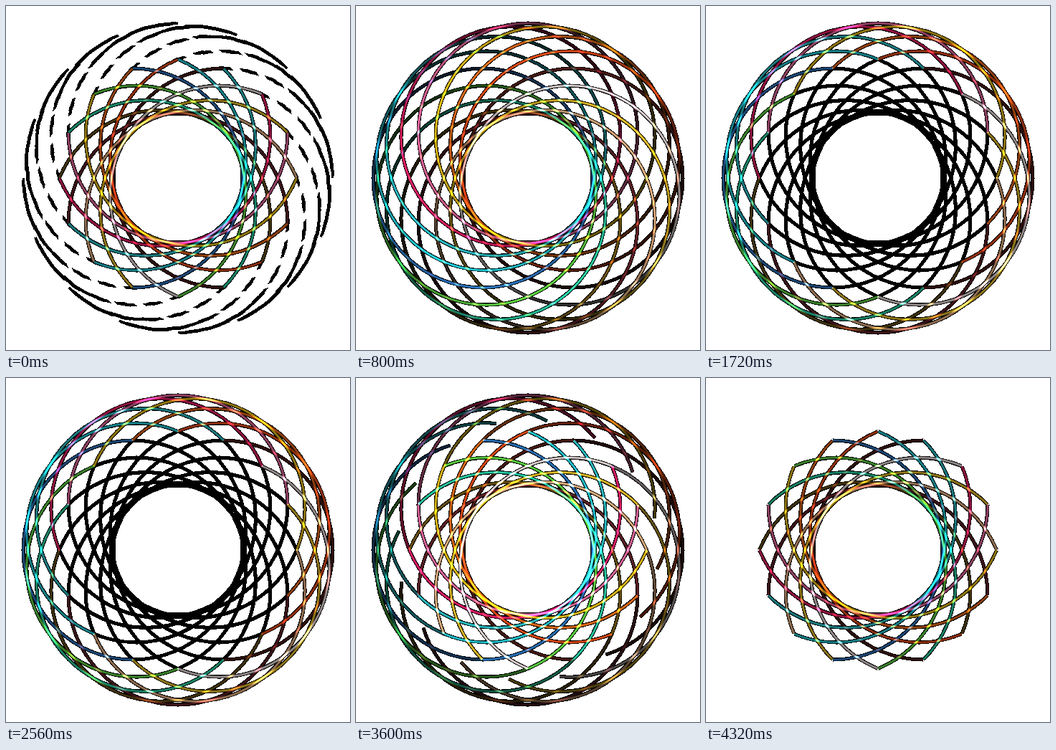
Animation of 480 by 480 pixels, one loop 5.16 s. Source, as an HTML page with a canvas:

```html
<!DOCTYPE html>
<html lang="en">
<head>
<meta charset="utf-8">
<title>Ring of circles</title>
<style>
html, body { margin: 0; width: 100%; height: 100%; overflow: hidden; background: #fff; }
canvas { display: block; width: 480px; height: 480px; }
</style>
</head>
<body>
<canvas id="stage" width="480" height="480"></canvas>
<script>
const SIZE = 480, MID = 240, RADIUS = 153, OFFSET = 63;
const LOOP = 5160, STEP = 40, TURN = 2 * Math.PI, PARTS = 60;
const IN_END = 1720, OUT_START = 2560, OUT_END = 1760;
const REST = 0.58, LINE = 5, HALO = 16, HALO_ALPHA = 0.06;

// One colour per circle, clockwise from the right
const COLORS = [
  [80, 26, 20], [255, 240, 240], [255, 210, 40], [255, 195, 140],
  [105, 34, 42], [115, 88, 20], [40, 230, 180], [100, 235, 70],
  [44, 125, 210], [35, 225, 240], [45, 215, 225], [255, 30, 110],
  [255, 110, 170], [255, 210, 20], [255, 115, 25], [255, 80, 20]
];

const ctx = document.getElementById('stage').getContext('2d', { willReadFrequently: true });
const glowCanvas = document.createElement('canvas');
glowCanvas.width = glowCanvas.height = SIZE;
const glow = glowCanvas.getContext('2d');

const clamp = v => Math.max(0, Math.min(1, v));
const mix = (a, b, p) => a + (b - a) * p;
const ease = v => (1 - Math.cos(Math.PI * clamp(v))) / 2;
const inner = x => x < 0.5 ? 1 : 0;

// Position x runs clockwise: 0 to .5 is the inner half, .5 to 1 the outer half
function arc(c, k, from, to) {
  const dir = k * TURN / 16, start = dir + TURN / 4;
  c.beginPath();
  c.arc(MID + OFFSET * Math.cos(dir), MID + OFFSET * Math.sin(dir), RADIUS,
    start + from * TURN, start + to * TURN);
  c.stroke();
}

// Light wave with its peak at c
function wave(x, c) {
  return x < c ? clamp(1 - (c - x) / 0.7) : Math.max(0.2, 1 - (x - c) / 0.4);
}

// Phase one: the light runs from the inner half to the outer half
function lightIn(x, t) {
  const c = Math.min(1, (t / 1120) ** 2);
  const moving = mix(REST * inner(x), wave(x, c), clamp(t / 500));
  return mix(moving, REST * (1 - inner(x)), ease((t - 1120) / 600));
}

// Phase two: the light gathers at the far end, then fills the inner half
function lightOut(x, t) {
  const ramp = Math.max(0.28, wave(x, 1));
  const full = inner(x) ? 0.9 : mix(0.42, 0.26, (x - 0.5) * 2);
  if (t < 440) return mix(REST * (1 - inner(x)), ramp, ease(t / 440));
  if (t < 1040) return mix(ramp, full, ease((t - 440) / 600));
  return mix(full, REST * inner(x), ease((t - 1040) / 720));
}

// Tracks are [from, to, alpha]
function stateAt(time) {
  if (time < OUT_START) {
    const t = Math.min(time, IN_END), rise = t / 150;
    return {
      light: x => lightIn(x, t), lo: 0, hi: 1,
      tracks: [[0, 0.5, 1], [0.5, 0.75, clamp(0.45 + rise)], [0.75, 1, clamp(0.38 + rise)]]
    };
  }
  const t = Math.min(time - OUT_START, OUT_END);
  const lo = 0.5 * (1 - ease(t / 1030));
  const hi = 1 - 0.5 * ease((t - 890) / 750);
  return {
    light: x => lightOut(x, t), lo, hi,
    tracks: [[lo, hi, 1], [0, lo, clamp(1 - t / 800)]]
  };
}

// Black lines with hard edges: faint ones only show near other lines,
// where a soft halo lifts them over the threshold
function drawTracks(tracks) {
  ctx.clearRect(0, 0, SIZE, SIZE);
  for (const [from, to, alpha] of tracks) {
    if (to - from < 0.001 || alpha <= 0) continue;
    for (const [width, a] of [[HALO, HALO_ALPHA], [LINE, alpha]]) {
      ctx.lineWidth = width;
      ctx.strokeStyle = `rgba(0,0,0,${a})`;
      for (let k = 0; k < 16; k++) arc(ctx, k, from, to);
    }
  }
  const image = ctx.getImageData(0, 0, SIZE, SIZE), d = image.data;
  for (let i = 3; i < d.length; i += 4) d[i] = d[i] > 127 ? 255 : 0;
  ctx.putImageData(image, 0, 0);
}

function drawGlow({ light, lo, hi }) {
  glow.globalCompositeOperation = 'source-over';
  glow.fillStyle = '#000';
  glow.fillRect(0, 0, SIZE, SIZE);
  glow.globalCompositeOperation = 'lighter';
  for (let i = 0; i < PARTS; i++) {
    const from = Math.max(lo, i / PARTS), to = Math.min(hi, (i + 1) / PARTS);
    if (to <= from) continue;
    const level = light((i + 0.5) / PARTS);
    if (level < 0.01) continue;
    for (const [width, share] of [[4, 0.5], [2.4, 0.5]]) {
      glow.lineWidth = width;
      for (let k = 0; k < 16; k++) {
        const rgb = COLORS[k].map(v => Math.round(share * v * level / (1 + v * level / 255)));
        glow.strokeStyle = `rgb(${rgb})`;
        arc(glow, k, from, to);
      }
    }
  }
  // Dodging the light with itself makes the crossings flare
  glow.globalCompositeOperation = 'color-dodge';
  glow.drawImage(glowCanvas, 0, 0);
}

function draw(time) {
  const state = stateAt(time);
  drawTracks(state.tracks);
  drawGlow(state);
  // Light only falls on the black lines
  ctx.globalCompositeOperation = 'source-atop';
  ctx.drawImage(glowCanvas, 0, 0);
  ctx.globalCompositeOperation = 'source-over';
}

const begin = performance.now();
let shown = -1;
function tick() {
  const time = Math.floor(((performance.now() - begin) % LOOP) / STEP) * STEP;
  if (time !== shown) draw(shown = time);
  requestAnimationFrame(tick);
}
tick();
</script>
</body>
</html>
```
